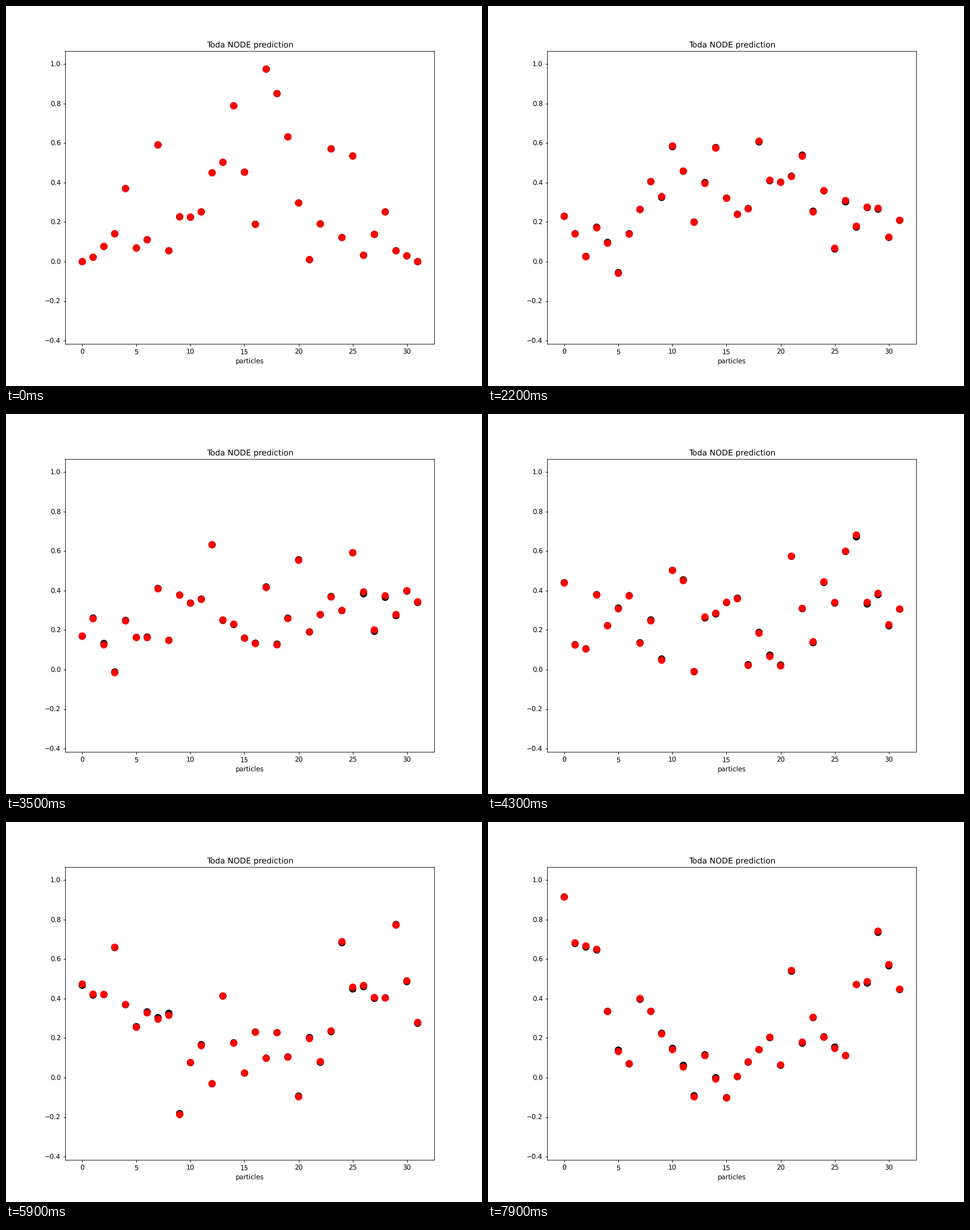
A matplotlib script that plays this animation: 837x669 px, repeating every 8 s.

```python
import numpy as np
import matplotlib.pyplot as plt
from matplotlib.animation import FuncAnimation

W, H, DPI = 837, 669, 83.7
FRAMES, INTERVAL = 80, 100
DT, SUBSTEPS = 0.2, 40
LEFT, RIGHT, TOP, BOTTOM = 104.6, 753.4, 79.9, 595.3  # plot box, px
ZERO, UNIT = 450, 347.6                               # y scale, px

# Displacements when the lattice is released from rest.
START = np.array([
    0, .022, .077, .141, .370, .069, .111, .591,
    .055, .227, .225, .252, .450, .503, .789, .453,
    .189, .975, .851, .632, .297, .010, .191, .571,
    .122, .535, .032, .138, .252, .055, .029, 0])


def force(q, stiff):
    """Periodic Toda lattice with exponential bonds."""
    bond = np.exp(stiff * (np.roll(q, 1) - q)) / stiff
    return bond - np.roll(bond, -1)


def simulate(stiff):
    q, p, h = START.copy(), np.zeros(START.size), DT / SUBSTEPS
    path = [q.copy()]
    for _ in range(FRAMES - 1):
        for _ in range(SUBSTEPS):
            p += h / 2 * force(q, stiff)
            q += h * p
            p += h / 2 * force(q, stiff)
        path.append(q.copy())
    return np.array(path)


truth = simulate(1)
guess = simulate(1.06)  # the learned bonds are slightly too stiff

plt.rcParams.update({"font.family": "DejaVu Sans", "text.hinting": "none"})
# The tiny margin keeps the pixel size from rounding down.
fig = plt.figure(figsize=((W + 1e-6) / DPI, (H + 1e-6) / DPI), dpi=DPI)
ax = fig.add_axes([LEFT / W, 1 - BOTTOM / H,
                   (RIGHT - LEFT) / W, (BOTTOM - TOP) / H])
ax.set(xlim=(-1.55, 32.55),
       ylim=((ZERO - BOTTOM) / UNIT, (ZERO - TOP) / UNIT),
       title="Toda NODE prediction", xlabel="particles")
for spine in ax.spines.values():
    spine.set_snap(False)

sites = np.arange(START.size)


def dots(color):
    # One size per dot keeps sub-pixel positions.
    return ax.scatter(sites, START, s=np.full(sites.size, 121),
                      color=color, linewidths=0)


true_dots, pred_dots = dots("black"), dots("red")


def update(i):
    true_dots.set_offsets(np.column_stack([sites, truth[i]]))
    pred_dots.set_offsets(np.column_stack([sites, guess[i]]))
    return true_dots, pred_dots


anim = FuncAnimation(fig, update, frames=FRAMES, interval=INTERVAL,
                     repeat=True, repeat_delay=0)
plt.show()
```
